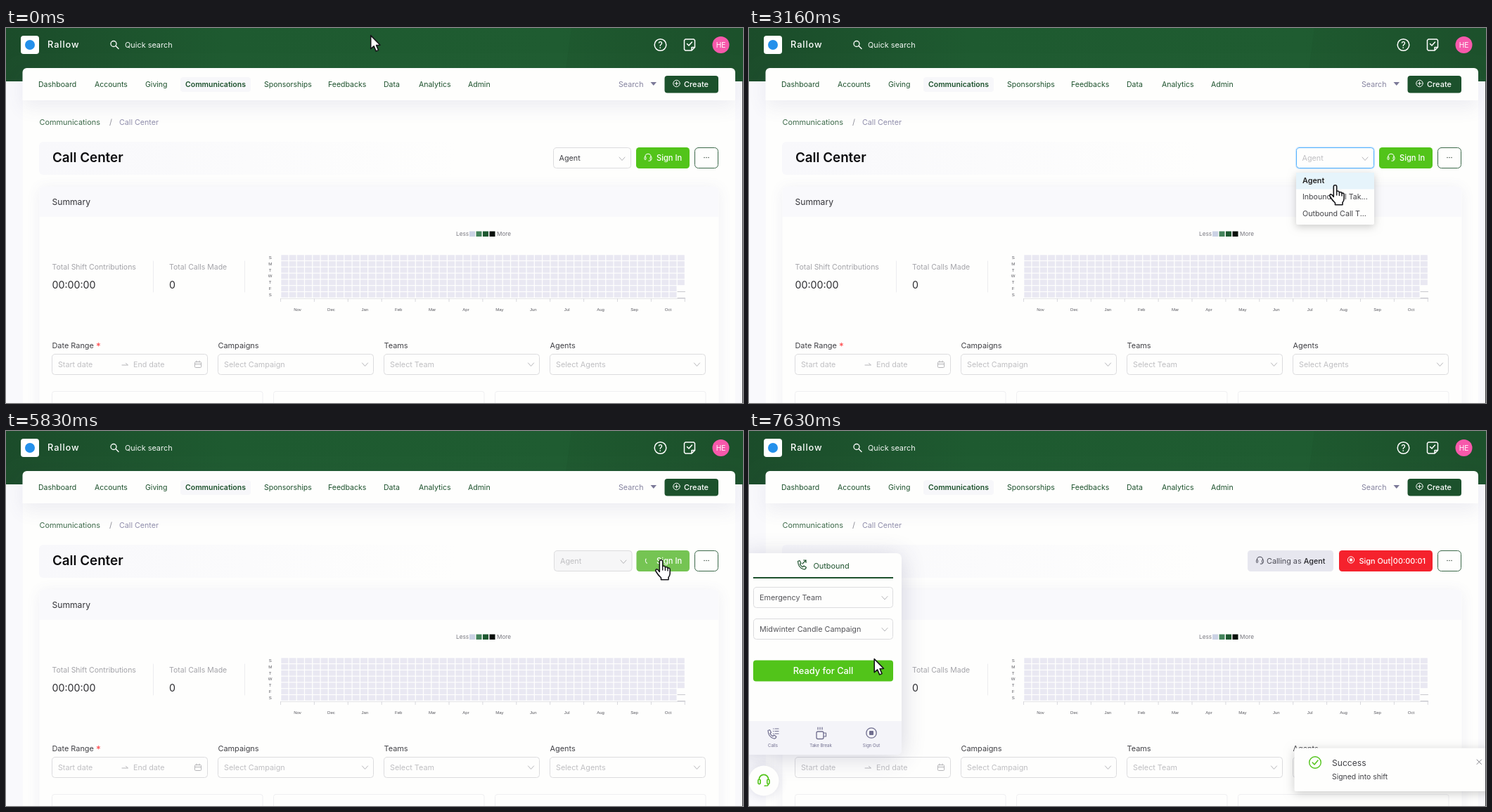
These frames come from a looping animation (1048x534 px, 8000 ms). An HTML page with a canvas:

```html
<!DOCTYPE html>
<html lang="en">
<head>
<meta charset="utf-8">
<title>Call Center</title>
<style>
html, body { margin: 0; width: 100%; height: 100%; overflow: hidden; background: #fefefd; }
canvas { display: block; width: 1048px; height: 534px; }
</style>
</head>
<body>
<canvas id="stage" width="1048" height="534"></canvas>
<script>
const ctx = document.getElementById('stage').getContext('2d');
const LOOP = 8000;
const GREEN = '#1c512c', LIME = '#52c41a', RED = '#f5222d', WHITE = '#fefefd', MIST = '#f9f9fc',
  INK = '#414146', GREY = '#8c8c96', FAINT = '#bfbfc2', LINE = '#dcdcde', PLUM = '#6f6d8e';

const clamp = v => Math.max(0, Math.min(1, v));
const phase = (t, a, b) => clamp((t - a) / (b - a));
const easeOut = p => 1 - (1 - p) ** 2;
const easeInOut = p => p * p * (3 - 2 * p);
const lerp = (a, b, p) => a + (b - a) * p;
const mix = (a, b, p) => `rgb(${a.map((v, i) => Math.round(lerp(v, b[i], p)))})`;

function text(s, x, y, size, color = INK, weight = 400, align = 'left', spacing = 0) {
  ctx.font = `${weight} ${size}px Inter, sans-serif`;
  ctx.letterSpacing = spacing + 'px';
  ctx.textAlign = align;
  ctx.fillStyle = color;
  ctx.fillText(s, x, y);
}

function box(x, y, w, h, r, fill, stroke, width = 1) {
  ctx.beginPath();
  ctx.roundRect(x, y, w, h, r);
  if (fill) { ctx.fillStyle = fill; ctx.fill(); }
  if (stroke) { ctx.strokeStyle = stroke; ctx.lineWidth = width; ctx.stroke(); }
}

function shadow(color, blur, dy, draw) {
  ctx.save();
  ctx.shadowColor = color;
  ctx.shadowBlur = blur;
  ctx.shadowOffsetY = dy;
  draw();
  ctx.restore();
}

function lines(color, width, ...paths) {
  ctx.strokeStyle = color;
  ctx.lineWidth = width;
  ctx.lineCap = ctx.lineJoin = 'round';
  ctx.beginPath();
  for (const p of paths)
    for (let i = 0; i < p.length; i += 2) i ? ctx.lineTo(p[i], p[i + 1]) : ctx.moveTo(p[0], p[1]);
  ctx.stroke();
}

function arc(x, y, r, color, width, from = 0, to = Math.PI * 2) {
  ctx.beginPath();
  ctx.arc(x, y, r, from, to);
  ctx.strokeStyle = color;
  ctx.lineWidth = width;
  ctx.stroke();
}

function disc(x, y, r, color) {
  ctx.beginPath();
  ctx.arc(x, y, r, 0, Math.PI * 2);
  ctx.fillStyle = color;
  ctx.fill();
}

const chevron = (x, y, color = '#b5b5b8') => lines(color, 1, [x - 4, y - 2, x, y + 2.5, x + 4, y - 2]);

function headset(x, y, s, color) {
  ctx.save();
  ctx.translate(x, y);
  ctx.scale(s, s);
  arc(0, -0.5, 4.2, color, 1.1, Math.PI, 0);
  box(-5, -0.5, 2, 4, 0.8, null, color, 1);
  box(3, -0.5, 2, 4, 0.8, null, color, 1);
  lines(color, 1, [4.2, 3.5, 3.5, 5, 0.8, 5.2]);
  ctx.restore();
}

function handset(x, y, color) {
  ctx.save();
  ctx.translate(x, y);
  ctx.beginPath();
  ctx.moveTo(-5.5, -4.5);
  ctx.lineTo(-3, -5.5);
  ctx.lineTo(-1, -1.8);
  ctx.lineTo(-2.6, -0.3);
  ctx.quadraticCurveTo(-1, 2.6, 1.6, 3.6);
  ctx.lineTo(3, 2);
  ctx.lineTo(6.4, 4.2);
  ctx.quadraticCurveTo(5.5, 7.5, 3, 7);
  ctx.quadraticCurveTo(-5, 5, -5.5, -4.5);
  ctx.strokeStyle = color;
  ctx.lineWidth = 1.2;
  ctx.stroke();
  ctx.restore();
}

function header() {
  const g = ctx.createLinearGradient(0, 60, 1048, 0);
  g.addColorStop(0, '#1b4c2a');
  g.addColorStop(0.3, '#1e5a30');
  g.addColorStop(0.75, '#1f5c31');
  g.addColorStop(1, '#1d532d');
  ctx.fillStyle = g;
  ctx.fillRect(0, 0, 1048, 76);
  ctx.fillStyle = 'rgba(18,60,30,.08)';
  ctx.beginPath();
  ctx.moveTo(804, 0);
  ctx.lineTo(1048, 0);
  ctx.lineTo(1048, 76);
  ctx.lineTo(794, 76);
  ctx.fill();

  box(21, 11, 26, 26, 4, '#fff');
  disc(34, 24, 7, '#2490eb');
  text('Rallow', 59, 28, 12.8, '#fff', 500, 'left', 0.9);
  arc(153, 22.5, 4, '#fff', 1.3);
  lines('#fff', 1.4, [156, 25.5, 160, 29.5]);
  text('Quick search', 169, 27.5, 10.9, '#f3f7f4');
  arc(930.5, 24, 8.3, '#fff', 1.5);
  text('?', 930.5, 28.5, 12.5, '#fff', 500, 'center');
  lines('#fff', 1.5, [975, 32, 966, 32, 964.5, 30.5, 964.5, 17.5, 966, 16, 978, 16, 979.5, 17.5, 979.5, 27.5, 975, 32],
    [975, 31, 975, 27.5, 979, 27.5], [968.5, 22.5, 971, 25, 975.5, 20]);
  disc(1016.5, 24, 12, '#f759ab');
  text('HE', 1016.5, 28, 10.2, '#fff', 400, 'center');
}

function nav() {
  shadow('rgba(90,90,150,.10)', 26, 10, () => box(23.5, 57, 1013.5, 46, [6, 6, 0, 0], WHITE));
  box(248, 70, 100, 21, 4, '#f7f7fa');
  const items = { Dashboard: 46, Accounts: 126, Giving: 198, Communications: 255, Sponsorships: 367,
    Feedbacks: 458, Data: 537, Analytics: 587, Admin: 657 };
  for (const [name, x] of Object.entries(items))
    text(name, x, 83.5, 10.5, GREEN, name === 'Communications' ? 600 : 400);
  text('Search', 871, 83.5, 10.7, '#85839f');
  ctx.fillStyle = '#7b7998';
  ctx.beginPath();
  ctx.moveTo(916.5, 77);
  ctx.lineTo(925, 77);
  ctx.lineTo(920.8, 82);
  ctx.fill();
  box(936.5, 68, 76.5, 24.5, 4, GREEN);
  arc(953.5, 79, 4.7, '#fff', 1);
  lines('#fff', 1, [951.2, 79, 955.8, 79], [953.5, 76.7, 953.5, 81.3]);
  text('Create', 964, 83.5, 11, '#fff', 500);
}

function heatmap() {
  text('Less', 640, 296, 8.2, '#77777f');
  ['#cbd2e4', '#43835a', '#1d5830', '#08100a'].forEach((c, i) => {
    ctx.fillStyle = c;
    ctx.fillRect(659 + i * 9.5, 289.5, 8, 7.5);
  });
  text('More', 698, 296, 8.2, '#77777f');

  const tiny = (s, x, y) => {
    ctx.font = '6px "Liberation Sans", sans-serif';
    ctx.letterSpacing = '0px';
    ctx.textAlign = 'center';
    ctx.fillStyle = '#55555c';
    ctx.fillText(s, x, y);
  };
  ctx.fillStyle = '#e9e8f2';
  for (let col = 0; col < 51; col++)
    for (let row = 0; row < (col === 50 ? 5 : 7); row++)
      ctx.fillRect(391.3 + col * 11.27, 323.3 + row * 8.8, 10, 7.6);
  [...'SMTWTFS'].forEach((d, i) => tiny(d, 375.7, 329 + i * 8.75));
  lines('#e4e4e8', 1, [390.5, 385.5, 966, 385.5]);
  lines('#c8c8ce', 1, [955, 375.5, 965.5, 375.5], [955, 384.5, 965.5, 384.5]);
  'Nov Dec Jan Feb Mar Apr May Jun Jul Aug Sep Oct'.split(' ')
    .forEach((m, i) => tiny(m, 414.5 + i * 47.9, 403));
  for (let i = 0; i <= 12; i++) lines('#d8d8dd', 1, [390.5 + i * 47.9, 385.5, 390.5 + i * 47.9, 389.5]);
}

function filters() {
  const fields = [['Date Range', 65.5], ['Campaigns', 301.5, 'Select Campaign'],
    ['Teams', 537.5, 'Select Team'], ['Agents', 773.5, 'Select Agents']];
  for (const [label, x, hint] of fields) {
    text(label, x, 456, 10.9);
    box(x, 464.5, 221, 29, 4, WHITE, LINE);
    if (!hint) continue;
    text(hint, x + 8.5, 482.5, 10.8, FAINT);
    chevron(x + 209, 479);
  }
  text('*', 128, 458, 13, '#ff4d4f', 500);
  text('Start date', 74, 482.5, 10.7, FAINT);
  text('End date', 181, 482.5, 10.7, FAINT);
  lines('#b5b5b8', 1, [165, 480, 173.5, 480, 170.5, 477.5]);
  box(268.5, 475.5, 9, 8, 1, null, '#b5b5b8');
  lines('#b5b5b8', 1, [268.5, 478.5, 277.5, 478.5], [271, 474, 271, 476], [275, 474, 275, 476]);
  for (const x of [65.5, 380.5, 695.5]) box(x, 517.5, 299.5, 40, 3, WHITE, '#efeff1');
}

function page() {
  ctx.fillStyle = MIST;
  ctx.fillRect(0, 0, 1048, 534);
  header();
  ctx.fillStyle = WHITE;
  ctx.fillRect(24, 90, 1013, 444);
  nav();

  text('Communications', 47.5, 138, 10.9, '#3d6a4a');
  text('/', 147, 138, 11, GREY);
  text('Call Center', 161, 138, 10.7, '#8f8dab');

  const fade = ctx.createLinearGradient(47, 0, 640, 0);
  fade.addColorStop(0, '#f8f8fb');
  fade.addColorStop(1, WHITE);
  box(47, 162, 600, 47, 6, fade);
  text('Call Center', 66, 190.5, 18.8, '#0c0c0e', 600);

  shadow('rgba(90,90,150,.09)', 20, 2, () => box(47.5, 226, 966, 340, 6, WHITE));
  box(47.5, 226, 966, 43, [6, 6, 0, 0], MIST);
  text('Summary', 65.5, 251.5, 12.1, '#333338');

  text('Total Shift Contributions', 65.5, 343.5, 10.5, '#a3a3a8');
  text('00:00:00', 65.5, 371, 14.2, '#2c2c30');
  text('Total Calls Made', 232, 343.5, 10.5, '#a3a3a8');
  text('0', 232, 371, 14.2, '#2c2c30');
  lines('#ececef', 1, [209.5, 332, 209.5, 376], [339.5, 332, 339.5, 376]);
  heatmap();
  filters();
  box(979.5, 170.5, 33, 29, 5, WHITE, '#3b6849');
  for (const x of [993, 996, 999]) disc(x, 184.5, 0.75, '#3b4a40');
}

function roleSelect(t) {
  if (t >= 5760) {
    box(779.5, 170.5, 110.5, 29, 4, '#f6f6f7', LINE);
    text('Agent', 788, 188.5, 10.8, FAINT);
    chevron(878, 186);
    return;
  }
  const glow = easeOut(phase(t, 1770, 2000));
  if (glow) box(778.5, 170.5, 110, 29, 4, null, `rgba(24,144,255,${0.16 * glow})`, 3.4);
  box(778.5, 170.5, 110, 29, 4, WHITE, mix([220, 220, 222], [84, 178, 255], phase(t, 1430, 1600)));
  text('Agent', 786.5, 188.5, 10.8, t > 1790 && t < 3180 ? FAINT : INK);
  chevron(876, 186);
}

function signIn(t) {
  const p = phase(t, 5740, 6040), x = lerp(896, 897.5, p);
  box(x, 170, 972 - x, 30, 4.5, mix([82, 196, 26], [197, 197, 214], p));
  if (t < 5760) headset(913, 184, 1, '#fff');
  else {
    const a = (Math.min(t, 6500) - 6500) / 1000 * Math.PI * 2;
    arc(914, 184.5, 4.6, '#fff', 1.1, a + 0.1, a + 1.6);
  }
  text('Sign In', 925, 188.5, 11.1, p > 0.5 ? '#f3f3f7' : '#fff', 500);
}

function signedIn(t) {
  box(709, 170, 122, 30, 4.5, '#e7e7ef');
  headset(726.5, 184, 1, '#4b4b58');
  text('Calling as ', 736, 188.5, 10.8, '#4b4b55');
  const w = ctx.measureText('Calling as ').width;
  text('Agent', 736 + w, 188.5, 10.8, '#26262b', 500);
  box(839, 170, 133, 30, 4.5, RED);
  arc(856, 183.5, 4.6, '#fff', 1);
  box(854, 181.5, 4, 4, 0.5, '#fff');
  text('Sign Out|00:00:0' + (t < 7520 ? 0 : 1), 867.5, 188.5, 10.9, '#fff', 500);
}

function dropdown(t) {
  const open = easeOut(phase(t, 1790, 2000)) * (1 - phase(t, 3160, 3400));
  if (!open) return;
  ctx.save();
  ctx.globalAlpha = open;
  ctx.translate(0, 206);
  ctx.scale(1, lerp(0.8, 1, open));
  shadow('rgba(0,0,0,.2)', 12, 3, () => box(778, 0, 111, 74, 2, WHITE));
  ctx.fillStyle = '#e6f4fb';
  ctx.fillRect(778, 0, 111, 23.5);
  text('Agent', 787, 15, 10.8, '#222', 600);
  text('Inbound Call Tak...', 787, 38.5, 10.6);
  text('Outbound Call T...', 787, 62.5, 10.7);
  ctx.restore();
}

function phonePanel(t) {
  ctx.save();
  ctx.globalAlpha = easeOut(phase(t, 6660, 6900));
  shadow('rgba(60,60,110,.22)', 34, 4, () => box(-10, 174, 227, 287, 7, WHITE));
  handset(75, 190, GREEN);
  lines(GREEN, 1.2, [76, 189, 81, 184], [77.5, 184, 81, 184, 81, 187.5]);
  text('Outbound', 91.5, 196, 10.9, GREEN);
  ctx.fillStyle = GREEN;
  ctx.fillRect(6, 208, 199, 2);
  [['Emergency Team', 222.5], ['Midwinter Candle Campaign', 267.5]].forEach(([s, y]) => {
    box(6.5, y, 198, 29, 4, WHITE, LINE);
    text(s, 15, y + 18, 10.8, '#55555a');
    chevron(193, y + 15);
  });
  box(6, 326.5, 199, 30, 4, LIME);
  text('Ready for Call', 105.5, 346, 12.8, '#fff', 500, 'center');

  box(-10, 413, 227, 48, [0, 0, 7, 7], '#f4f4f9');
  handset(32.5, 431, PLUM);
  for (const y of [424, 427.5, 431]) lines(PLUM, 1.2, [34.5, y, 35, y], [37, y, 42, y]);
  box(96, 428, 10, 10.5, 2, null, PLUM, 1.3);
  lines(PLUM, 1.2, [106, 430, 109.5, 430, 109.5, 435, 106, 435], [98, 422, 98, 425], [101, 422, 101, 425], [104, 422, 104, 425]);
  arc(174, 430, 7.2, PLUM, 1.3);
  box(171, 427, 6, 6, 1, PLUM);
  [['Calls', 34], ['Take Break', 102], ['Sign Out', 174]].forEach(([s, x]) => text(s, x, 450, 6, PLUM, 400, 'center'));

  shadow('rgba(60,60,110,.14)', 14, 1, () => disc(21, 498, 21.5, WHITE));
  headset(21, 497, 1.6, LIME);
  ctx.restore();
}

function toast(t) {
  const p = easeOut(phase(t, 6660, 6930));
  ctx.save();
  ctx.globalAlpha = p;
  ctx.translate((1 - p) * 272, 0);
  shadow('rgba(0,0,0,.2)', 14, 3, () => box(775.5, 451.5, 290, 61.5, 2, WHITE));
  arc(805, 472, 8.3, LIME, 1.4);
  lines(LIME, 1.5, [801.2, 472, 804, 475, 809, 469]);
  text('Success', 829, 477, 12.1);
  text('Signed into shift', 829, 495.5, 10.4);
  lines('#85858c', 1, [1035, 468, 1041.5, 474.5], [1041.5, 468, 1035, 474.5]);
  ctx.restore();
}

// Each move: start, end, from x/y, to x/y, easing. The latest started move wins.
const moves = [
  [1430, 1431, 827, 179, 827, 179, easeOut],
  [2000, 2600, 827, 179, 832, 223, easeInOut],
  [4030, 4430, 837, 221, 861.5, 192, easeInOut],
  [4900, 5030, 861.5, 192, 901.5, 182, p => p],
  [5030, 5260, 901.5, 182, 930, 183, easeOut],
  [7400, 7630, 930, 183, 177.5, 324, easeOut]
];

function pointer(t) {
  if (t < 1430) {
    const p = easeInOut(phase(t, 600, 1400)), q = 1 - p;
    const curve = (a, b, c, d) => q ** 3 * a + 3 * q * q * p * b + 3 * q * p * p * c + p ** 3 * d;
    return [curve(518, 580, 760, 826), curve(10, -25, 60, 177)];
  }
  const [a, b, x0, y0, x1, y1, ease] = moves.filter(m => t >= m[0]).pop();
  const p = ease(phase(t, a, b));
  return [lerp(x0, x1, p), lerp(y0, y1, p)];
}

function isHand(t, x, y) {
  if (t < 1430) return false;
  if (t < 4030) return true;
  if (t >= 6660) return x > 839 && y < 200;
  return y < 200 && (x < 889 || x > 896);
}

function cursor(t) {
  const [x, y] = pointer(t);
  ctx.save();
  ctx.fillStyle = '#fff';
  ctx.strokeStyle = '#16161a';
  ctx.lineJoin = ctx.lineCap = 'round';
  ctx.lineWidth = 1.6;
  ctx.beginPath();
  if (isHand(t, x, y)) {
    ctx.translate(x - 7, y);
    ctx.moveTo(6.3, 17.5);
    ctx.lineTo(6.3, 3);
    ctx.quadraticCurveTo(6.3, 0.8, 8.5, 0.8);
    ctx.quadraticCurveTo(10.7, 0.8, 10.7, 3);
    ctx.lineTo(10.7, 9.5);
    ctx.quadraticCurveTo(14, 8.5, 14.4, 11);
    ctx.quadraticCurveTo(17.5, 10, 18, 12.3);
    ctx.quadraticCurveTo(21.2, 11.5, 21.2, 14.5);
    ctx.lineTo(21.2, 20);
    ctx.quadraticCurveTo(21, 23, 19, 25.5);
    ctx.lineTo(19, 28.7);
    ctx.lineTo(8.5, 28.7);
    ctx.lineTo(8.5, 26);
    ctx.quadraticCurveTo(4.5, 22.5, 1.2, 17);
    ctx.quadraticCurveTo(0, 14, 2.5, 13.7);
    ctx.quadraticCurveTo(4.3, 14, 6.3, 17.5);
    ctx.fill();
    ctx.stroke();
    lines('#16161a', 1.4, [10.7, 9.5, 10.7, 15], [14.4, 11, 14.4, 15.5], [18, 12.3, 18, 16]);
  } else {
    ctx.translate(x + 0.7, y + 0.6);
    ctx.moveTo(0, 0);
    for (const [px, py] of [[0, 19], [4.4, 15.2], [7.4, 22.3], [10.8, 20.8], [7.9, 14], [13.3, 13.6]]) ctx.lineTo(px, py);
    ctx.closePath();
    ctx.fill();
    ctx.stroke();
  }
  ctx.restore();
}

function draw(t) {
  page();
  if (t < 6660) {
    roleSelect(t);
    signIn(t);
    dropdown(t);
  } else {
    signedIn(t);
    phonePanel(t);
    toast(t);
  }
  ctx.fillStyle = '#3a3a3e';
  ctx.fillRect(1047, 76, 1, 458);
  cursor(t);
}

const start = performance.now();
function tick() {
  draw((performance.now() - start) % LOOP);
  requestAnimationFrame(tick);
}
tick();
</script>
</body>
</html>
```
